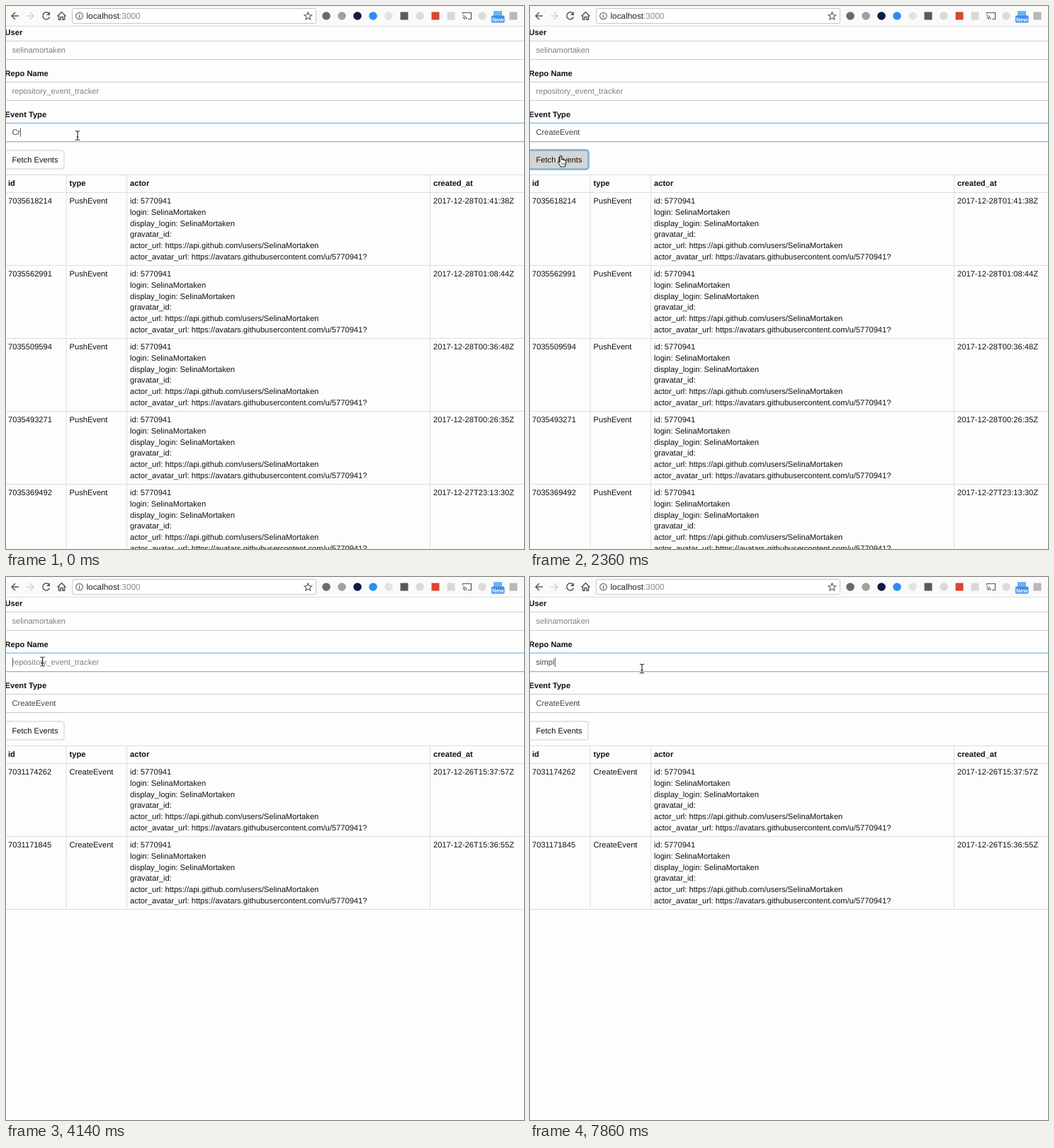
Write an HTML page that moves like this. It is 731x767 px and loops after 8 s.

```html
<!DOCTYPE html>
<html lang="en">
<head>
<meta charset="utf-8">
<title>Repository events</title>
<style>
  html, body { margin: 0; width: 100%; height: 100%; overflow: hidden; background: #fdfdfd; }
  svg { display: block; }
  text { font: 11.15px "Liberation Sans", Arial, sans-serif; fill: #111; text-rendering: geometricPrecision; white-space: pre; }
  .bold { font-weight: bold; }
  .entry { fill: #444; }
  .hint { fill: #808080; }
  .url { font-size: 11.8px; fill: #222; }
  .badge { font-size: 8px; font-weight: bold; fill: #fff; text-anchor: middle; }
  .line { fill: none; stroke: #ddd; }
  .icon { fill: none; stroke: #5a5a5a; stroke-width: 1.5; }
  .field { fill: #fefefe; stroke: #ccc; }
  .glow { fill: none; stroke: #66afe9; stroke-width: 4; }
</style>
</head>
<body>
<svg id="stage" width="731" height="767" viewBox="0 0 731 767">
  <rect width="731" height="767" fill="#fdfdfd"/>
  <g id="toolbar">
    <rect width="731" height="28" fill="#fafafa"/>
    <path class="line" d="M0 28.5H731"/>
    <path class="icon" d="M18 14H8M13 9L8 14L13 19"/>
    <path class="icon" style="stroke:#d2d2d2" d="M29 14H39M34 9L39 14L34 19"/>
    <path class="icon" d="M60.6 10.6A5 5 0 1 0 61.5 15.6"/>
    <path fill="#5a5a5a" d="M62 8V13H57Z"/>
    <path class="icon" d="M72.5 14.5L78.5 8.5L84.5 14.5M74.5 13.5V19.2H77V15.5H80V19.2H82.5V13.5"/>
    <rect x="93.5" y="3.5" width="344" height="21" rx="2" fill="#fff" stroke="#c6c6c6"/>
    <circle class="icon" style="stroke-width:1.1" cx="103.5" cy="14" r="4.8"/>
    <path class="icon" style="stroke-width:1.2" d="M103.5 13V17M103.5 11V12.2"/>
    <text class="url" x="113.5" y="18">localhost<tspan fill="#8a8a8a">:3000</tspan></text>
    <path class="icon" style="stroke-width:1.1" d="M426.3 8.8L427.8 12.5L431.7 12.8L428.7 15.3L429.7 19.1L426.3 17L422.9 19.1L423.9 15.3L420.9 12.8L424.8 12.5Z"/>
  </g>
  <g id="form"></g>
  <g id="table"></g>
  <path id="caret" stroke="#444" stroke-width="0.8"/>
  <g id="pointer"></g>
</svg>
<script>
const LOOP = 8000;
const USER = "SelinaMortaken";
const $ = id => document.getElementById(id);

function add(parent, tag, attrs, content) {
  const el = document.createElementNS("http://www.w3.org/2000/svg", tag);
  for (const key in attrs) el.setAttribute(key, attrs[key]);
  if (content !== undefined) el.textContent = content;
  parent.append(el);
  return el;
}
const write = (parent, x, y, content, cls = "") => add(parent, "text", { x, y, class: cls }, content);

// Toolbar extensions: plain marks, 22px apart
const marks = [
  ["o", "#6a6a6a"], ["o", "#a0a0a0"], ["o", "#101a42"], ["o", "#2f8cf3"], ["o", "#e2e2e2"], ["s", "#5a5a5a"],
  ["o", "#dadada"], ["s", "#d9472f"], ["s", "#d8d8d8"], null, ["o", "#dcdcdc"], null, ["s", "#b8b8b8"]
];
marks.forEach((mark, i) => {
  if (!mark) return;
  const x = 452 + 22 * i, [shape, fill] = mark;
  if (shape === "o") add($("toolbar"), "circle", { cx: x, cy: 14, r: 5.8, fill });
  else add($("toolbar"), "rect", { x: x - 5.5, y: 8.5, width: 11, height: 11, fill });
});
add($("toolbar"), "path", { class: "icon", style: "stroke-width:1.2", d: "M644.5 11.5V9.5H656.5V18.5H652M644.5 13.5A5.5 5.5 0 0 1 650 19M644.5 16.2A2.8 2.8 0 0 1 647.3 19" });
add($("toolbar"), "rect", { x: 688, y: 7, width: 12, height: 8, fill: "#71b1ef" });
add($("toolbar"), "rect", { x: 685, y: 13.5, width: 18.5, height: 10, rx: 1.5, fill: "#3e8fea" });
write($("toolbar"), 694.2, 21.5, "New", "badge");

// Form
function makeField(label, y, value, cls) {
  const form = $("form");
  write(form, -1.5, y - 8, label, "bold");
  const glow = add(form, "rect", { class: "glow", x: -8, y: y + 0.5, width: 760, height: 26 });
  const box = add(form, "rect", { class: "field", x: -8, y: y + 0.5, width: 760, height: 26 });
  const text = write(form, 8.5, y + 17, value, cls);
  return {
    y, text,
    focus(level) {
      glow.style.opacity = 0.14 * level;
      box.style.stroke = ["#ccc", "#a3c6e2", "#74b5e7"][level * 2];
    }
  };
}
const fields = {
  user: makeField("User", 49, USER.toLowerCase(), "hint"),
  repo: makeField("Repo Name", 107, "", "hint"),
  event: makeField("Event Type", 165, "", "entry")
};
const ring = add($("form"), "rect", { x: -2, y: 203.5, width: 84.5, height: 27, rx: 3.5, fill: "none", stroke: "#8cc4f2", "stroke-width": 3 });
const button = add($("form"), "rect", { x: -1.5, y: 204, width: 83.5, height: 26, rx: 3 });
write($("form"), 8.5, 220.5, "Fetch Events");

const buttonLooks = {
  plain: ["#fefefe", "#ccc", 0],
  hover: ["#e8e8e8", "#b5b5b5", 0],
  down: ["#d4d4d4", "#559fda", 1],
  focus: ["#e6e6e6", "#559fda", 1]
};

// Table
const columns = [3, 89.5, 175, 603];
const pushes = [
  ["7035618214", "2017-12-28T01:41:38Z"], ["7035562991", "2017-12-28T01:08:44Z"],
  ["7035509594", "2017-12-28T00:36:48Z"], ["7035493271", "2017-12-28T00:26:35Z"],
  ["7035369492", "2017-12-27T23:13:30Z"]
];
const creates = [["7031174262", "2017-12-26T15:37:57Z"], ["7031171845", "2017-12-26T15:36:55Z"]];
const actor = [
  "id: 5770941", "login: " + USER, "display_login: " + USER, "gravatar_id:",
  "actor_url: https://api.github.com/users/" + USER,
  "actor_avatar_url: https://avatars.githubusercontent.com/u/5770941?"
];

function makeTable(type, rows) {
  const g = add($("table"), "g", {});
  const end = 263.5 + 103 * rows.length;
  let d = "M0 238.5H731M0 263.5H731";
  for (const x of [85, 170.5, 598.5]) d += `M${x} 238.5V${end}`;
  ["id", "type", "actor", "created_at"].forEach((name, i) => write(g, columns[i], 254.2, name, "bold"));
  rows.forEach(([id, date], r) => {
    const y = 279.1 + 103 * r;
    d += `M0 ${366.5 + 103 * r}H731`;
    write(g, columns[0], y, id);
    write(g, columns[1], y, type);
    actor.forEach((line, i) => write(g, columns[2], y + 15.7 * i, line));
    write(g, columns[3], y, date);
  });
  add(g, "path", { class: "line", d });
  return g;
}
const tables = { push: makeTable("PushEvent", pushes), create: makeTable("CreateEvent", creates) };

// Pointers, each drawn around its hot spot
const beam = "M-3.2 -6.5Q-0.3 -6.5 0 -5Q0.3 -6.5 3.2 -6.5M0 -5.5V5.5M-3.2 6.5Q-0.3 6.5 0 5Q0.3 6.5 3.2 6.5M-1.5 2H1.5";
const pointers = { beam: add($("pointer"), "g", {}), arrow: add($("pointer"), "g", {}), hand: add($("pointer"), "g", {}) };
add(pointers.beam, "path", { d: beam, fill: "none", stroke: "#fff", "stroke-width": 2.4, opacity: 0.7 });
add(pointers.beam, "path", { d: beam, fill: "none", stroke: "#222", "stroke-width": 1.1 });
add(pointers.arrow, "path", { d: "M0 0V12L2.8 9.5L4.8 14L7 13L5 8.7H8.7Z", fill: "#111", stroke: "#fff", "stroke-width": 1 });
add(pointers.hand, "path", {
  d: "M-1.8 8V1Q-1.8 -0.5 -0.6 -0.5Q0.7 -0.5 0.7 1V5Q2.2 4 3 5.5Q4.3 4.8 5 6.2Q6.8 5.8 6.8 7.8V10Q6.5 12.5 5.2 15H-0.8Q-1.8 12.5 -4 10Q-5 8 -3.6 7.6Q-2.6 7.6 -1.8 9Z",
  fill: "#fff", stroke: "#222", "stroke-width": 1.1, "stroke-linejoin": "round"
});
add(pointers.hand, "path", { d: "M1 9.5V12.5M3 9.5V12.5M5 9.5V12.5", stroke: "#222", "stroke-width": 0.7 });

// Each step changes part of the state from its time on
const steps = [
  [0, { event: "Cr", repo: "", field: "event", level: 1, caret: true, button: "plain", table: "push", at: ["beam", 101, 183] }],
  [140, { event: "Cre" }],
  [290, { event: "Creat" }],
  [440, { event: "Create" }],
  [740, { event: "CreateE" }],
  [890, { event: "CreateEv" }],
  [1030, { event: "CreateEve" }],
  [1180, { event: "CreateEvent" }],
  [1770, { caret: false, at: ["beam", 80, 184] }],
  [1920, { at: ["arrow", 45, 190.5] }],
  [2070, { at: ["hand", 44, 207], button: "hover" }],
  [2210, { at: ["hand", 44, 212] }],
  [2360, { button: "down" }],
  [2510, { button: "focus", level: 0, table: "create" }],
  [2960, { at: ["hand", 45, 206] }],
  [3110, { at: ["beam", 50, 176] }],
  [3250, { at: ["beam", 52, 140] }],
  [3400, { at: ["beam", 52, 111] }],
  [3540, { at: ["beam", 51.5, 119.5] }],
  [3990, { button: "plain", field: "repo", level: 0.5, caret: true }],
  [4140, { level: 1 }],
  [4590, { caret: false }],
  [4740, { at: ["beam", 55, 96] }],
  [4890, { at: ["beam", 63, 74] }],
  [5040, { caret: true, at: ["beam", 128, 114] }],
  [5180, { at: ["beam", 158, 129.5] }],
  [5470, { caret: false }],
  [6070, { caret: true }],
  [6520, { caret: false }],
  [6970, { caret: true }]
];
[7270, 7420, 7570, 7710, 7860].forEach((time, i) => steps.push([time, { repo: "simpl".slice(0, i + 1) }]));

function draw(s) {
  const { repo, event } = fields;
  event.text.textContent = s.event;
  repo.text.textContent = s.repo || "repository_event_tracker";
  repo.text.setAttribute("class", s.repo ? "entry" : "hint");
  for (const name in fields) fields[name].focus(name === s.field ? s.level : 0);

  const [fill, stroke, ringed] = buttonLooks[s.button];
  button.style.fill = fill;
  button.style.stroke = stroke;
  ring.style.opacity = ringed;
  for (const name in tables) tables[name].style.display = name === s.table ? "" : "none";

  const active = fields[s.field];
  const width = s[s.field] ? active.text.getComputedTextLength() : 0;
  $("caret").setAttribute("d", `M${Math.round(8.5 + width) + 0.5} ${active.y + 7}v13`);
  $("caret").style.display = s.caret ? "" : "none";

  const [kind, x, y] = s.at;
  for (const name in pointers) pointers[name].style.display = name === kind ? "" : "none";
  $("pointer").setAttribute("transform", `translate(${x} ${y})`);
}

const start = performance.now();
let shown = 0;
function tick() {
  const t = (performance.now() - start) % LOOP;
  const count = steps.filter(step => step[0] <= t).length;
  if (count !== shown) {
    shown = count;
    draw(Object.assign({}, ...steps.slice(0, count).map(step => step[1])));
  }
  requestAnimationFrame(tick);
}
tick();
</script>
</body>
</html>
```
